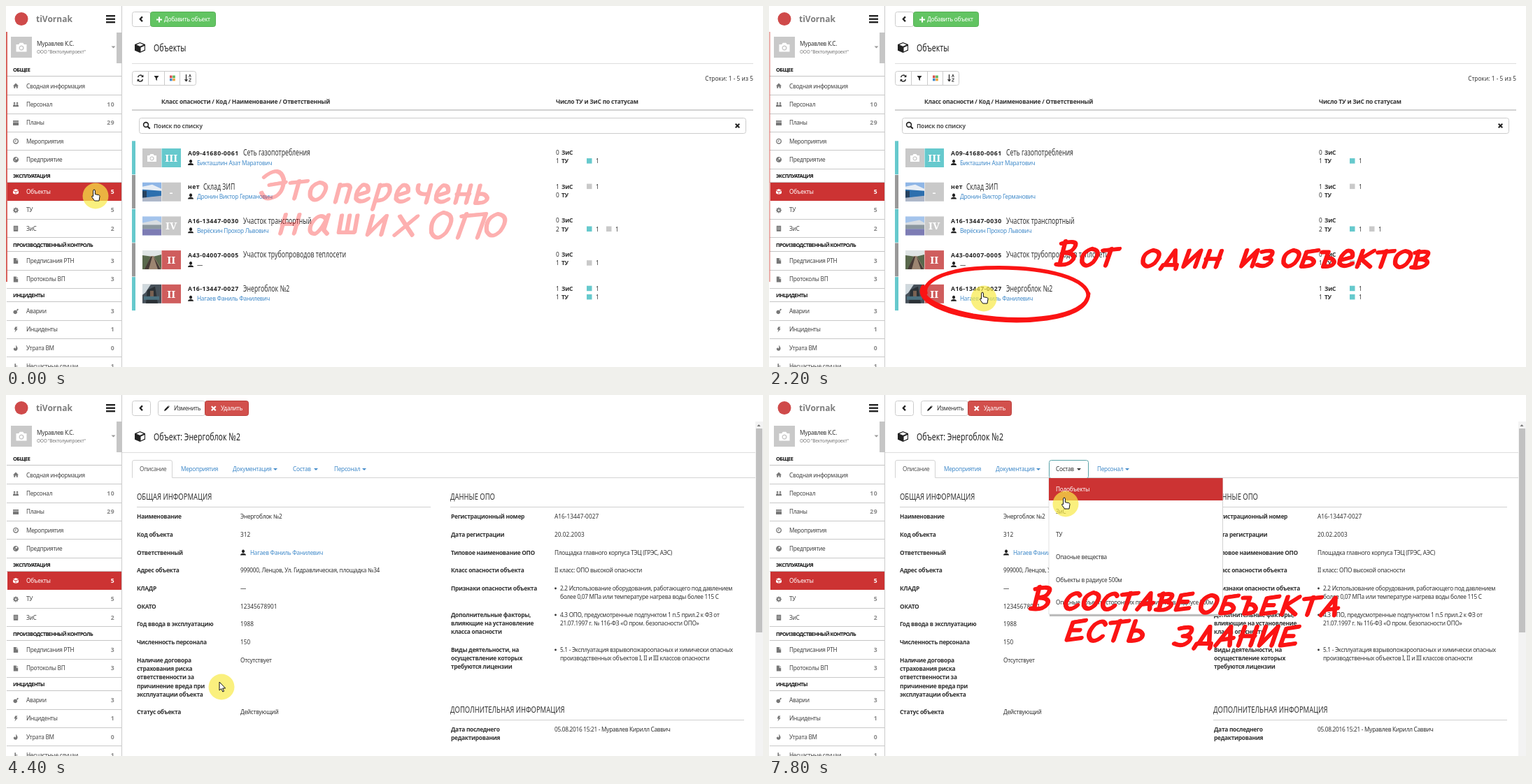
These frames come from a looping animation (1082 by 517 pixels, 8000 ms). An HTML page:

```html
<!DOCTYPE html>
<html lang="ru">
<head>
<meta charset="utf-8">
<style>
html,body{margin:0;width:100%;height:100%;overflow:hidden;background:#fff}
svg{display:block;width:100vw;height:100vh}
text{font:8.25px "Noto Sans","Open Sans",sans-serif;letter-spacing:-.28px;white-space:pre}
.b{font-weight:700;font-size:8.4px}
.cap{font-weight:700;font-size:7.4px;letter-spacing:-.58px}
.head{font-weight:700;font-size:8.5px;letter-spacing:-.22px}
.code{font-weight:700;font-size:8.7px;letter-spacing:.45px}
.num{letter-spacing:.05px}
.cnt{font-weight:700;font-size:8.6px;letter-spacing:.4px;text-anchor:end}
.org{font-size:6.6px;letter-spacing:-.3px}
.logo{font-weight:700;font-size:12px;letter-spacing:0}
.cls{font:700 15px "Noto Serif",serif;letter-spacing:0;text-anchor:middle}
.nar{letter-spacing:0}
.end{text-anchor:end}
.ink path{fill:none;stroke:#fb1414;vector-effect:non-scaling-stroke;stroke-linejoin:round;stroke-linecap:round}
</style>
</head>
<body>
<svg id="stage" viewBox="0 0 1082 517" preserveAspectRatio="none"></svg>
<script>
const TEAL = '#66c9cd', GREY = '#c9c9c9', RED = '#cf5d5d', ROW = '#cc3333', BLUE = '#428bca', DARK = '#333';

// ---- drawing helpers
const text = (x, y, s, cls = '', fill = DARK) => `<text x="${x}" y="${y}" class="${cls}" fill="${fill}">${s}</text>`;
const narrow = (x, y, size, s, fill = DARK) =>
  `<text class="nar" transform="translate(${x} ${y}) scale(.7 1)" style="font-size:${size}px" fill="${fill}">${s}</text>`;
const rect = (x, y, w, h, fill, more = '') => `<rect x="${x}" y="${y}" width="${w}" height="${h}" fill="${fill}" ${more}/>`;
const hline = (x1, x2, y, c = '#ddd', w = 1) => `<path d="M${x1} ${y}H${x2}" stroke="${c}" stroke-width="${w}"/>`;
const icon = (d, x, y, size, fill) =>
  `<path d="${d}" transform="translate(${x} ${y}) scale(${size / 10})" fill="${fill}" fill-rule="evenodd"/>`;
const box = (x, y, w, h, fill = '#fff', line = '#ccc') => rect(x + .5, y + .5, w - 1, h - 1, fill, `stroke="${line}" rx="3"`);
const caret = (x, y, c) => `<path d="M${x} ${y}h6l-3 3z" fill="${c}"/>`;
const group = (id, body, more = '') => `<g id="${id}" ${more}>${body}</g>`;

const menuIcon = {
  home: 'M5 0L10 5H8.5V9H6V6H4V9H1.5V5H0z',
  people: 'M2.5 1a1.7 1.7 0 1 0 .1 0zM7.5 1a1.7 1.7 0 1 0 .1 0zM0 9Q0 4.8 2.5 4.8T5 9Q5 4.8 7.5 4.8T10 9z',
  plan: 'M0 1H10V3H0zM0 4H10V9.5H0z',
  clock: 'M5 0a5 5 0 1 0 .1 0zM5 1.6a3.4 3.4 0 1 1-.1 0zM4.4 2.5H5.6V5.6H3V4.6H4.4z',
  globe: 'M5 0a5 5 0 1 0 .1 0zM5 2H8L7 5L4 4zM2 5L4 6V8z',
  file: 'M1 0H6V4H9V10H1zM7 0L9 3H7z',
  bomb: 'M4 3a3.6 3.6 0 1 0 .1 0zM6 3L8.5.5L10 2L7.5 4.5z',
  bolt: 'M4 0H8L6 3.5H8.5L3 10L4.5 5H2z'
};
const moreIcon = {
  cube: 'M5 0L10 2.2L5 4.4L0 2.2zM0 3.2L4.5 5.2V10L0 7.8zM10 3.2L5.5 5.2V10L10 7.8z',
  block: 'M5 0L10 2V7.8L5 10L0 7.8V2zM5 .9L8.4 2.3L5 3.8L1.6 2.3zM5.7 5L9.3 3.3V7.2L5.7 8.9z',
  gear: 'M4 0H6V2L8 1L9 2L8 4H10V6H8L9 8L8 9L6 8V10H4V8L2 9L1 8L2 6H0V4H2L1 2L2 1L4 2zM5 3.5a1.5 1.5 0 1 0 .1 0z',
  house: 'M1 0H9V10H1zM3 2V3.5H4.3V2zM5.7 2V3.5H7V2zM3 5V6.5H4.3V5zM5.7 5V6.5H7V5z',
  fire: 'M5 0Q9 4 8 7Q7 10 5 10Q1 10 1 6L3 4Q3 6 4.5 6Q6 4 5 0z',
  chair: 'M3 0H5V4H8V5H5V6H8L9 9H8L7 7H4Q2 9 3 6z'
};
const uiIcon = {
  camera: 'M0 2H2.5L3.5.5H6.5L7.5 2H10V9H0zM5 3a2.4 2.4 0 1 0 .1 0zM5 4a1.4 1.4 0 1 1-.1 0z',
  user: 'M5 0a2.6 3 0 1 0 .1 0zM0 10Q0 6.5 5 6.5T10 10z',
  plus: 'M3.7 0H6.3V3.7H10V6.3H6.3V10H3.7V6.3H0V3.7H3.7z',
  cross: 'M2 0L5 3L8 0L10 2L7 5L10 8L8 10L5 7L2 10L0 8L3 5L0 2z',
  pencil: 'M0 10L1 7L7 1L9 3L3 9zM7.6.4L8.2 0L10 1.8L9.6 2.4z',
  filter: 'M0 0H10L6.2 5V10L3.8 8V5z',
  back: 'M6 0L8 2L5 5L8 8L6 10L1.5 5z'
};

// ---- sidebar
const menu = [
  ['ОБЩЕЕ', 91, [['home', 'Сводная информация'], ['people', 'Персонал', 10], ['plan', 'Планы', 29], ['clock', 'Мероприятия'], ['globe', 'Предприятие']]],
  ['ЭКСПЛУАТАЦИЯ', 242.5, [['cube', 'Объекты', 5], ['gear', 'ТУ', 5], ['house', 'ЗиС', 2]]],
  ['ПРОИЗВОДСТВЕННЫЙ КОНТРОЛЬ', 341.5, [['file', 'Предписания РТН', 3], ['file', 'Протоколы ВП', 3]]],
  ['ИНЦИДЕНТЫ', 413.5, [['bomb', 'Аварии', 3], ['bolt', 'Инциденты', 1], ['fire', 'Утрата ВМ', 0], ['chair', 'Несчастные случаи', 1]]]
];
const icons = { ...menuIcon, ...moreIcon };

function sidebar() {
  let s = '<circle cx="22" cy="18.5" r="9.5" fill="#cf4a4a"/>' + text(43, 22.5, 'tiVornak', 'logo', '#7d7d7d');
  for (const y of [13, 17.5, 22]) s += rect(143, y, 13, 2.4, '#222');
  s += rect(7, 44, 30, 30, GREY) + icon(uiIcon.camera, 14.5, 52, 15, '#fff');
  s += text(44, 57, 'Муравлев К.С.') + text(44, 68, 'ООО "Вектолумпроект"', 'org', '#777') + caret(150.5, 57.5, '#999');
  for (const [title, y, items] of menu) {
    s += text(10, y + 3, title, 'cap', '#111') + hline(1, 165, Math.round(y + 9) + .5, '#c4c4c4');
    items.forEach(([ic, label, n], i) => {
      const c = y + 23.6 + i * 26.35, on = label === 'Объекты';
      if (on) s += rect(2, 253, 164, 26, ROW);
      else s += hline(1, 165, Math.round(c + 12.6) + .5, '#c9c9c9');
      s += icon(icons[ic], 10, c - 4, 8, on ? '#fff' : '#777');
      s += text(29, c + 3, label, '', on ? '#fff' : '#444');
      if (n !== undefined) s += text(155, c + 3, n, 'cnt', on ? '#fff' : '#888');
    });
  }
  return s + '<path d="M165.5 0V517" stroke="#ccc"/>' + rect(158, 38, 8, 44, '#c6c6c6');
}

// ---- list page
const thumbs = [
  [['#c9c9c9', 'M0 0H27V27H0z']],
  [['#8fb6e6', 'M0 0H27V27H0z'], ['#e8eef5', 'M0 6L14 3L27 9V13L0 11z'], ['#2d6fae', 'M0 10L27 12V20L0 22z'], ['#26415e', 'M0 12H6V22H0z'], ['#aeb6c6', 'M0 22L27 19V27H0z']],
  [['#a4c4ec', 'M0 0H27V27H0z'], ['#d8dde2', 'M0 9L20 5L27 9V18H0z'], ['#8c98a0', 'M0 12H27V18H0z'], ['#7d7cb4', 'M0 18H27V27H0z']],
  [['#59684c', 'M0 0H27V27H0z'], ['#dfe4e4', 'M0 0H27V6L15 9L0 7z'], ['#9c8571', 'M12 8H16L27 27H4z'], ['#453a35', 'M12 9L3 27H9L14 9zM16 9L22 27H26z']],
  [['#47515a', 'M0 0H27V27H0z'], ['#cfd8dd', 'M0 0H12L4 12L0 15z'], ['#2b3136', 'M7 8L18 3L22 27H5z'], ['#796152', 'M11 9H16V18H11z'], ['#4c7180', 'M2 17H24V22H2z']]
];
const rows = [
  ['A09-41680-0061', 'Сеть газопотребления', 'Бикташлин Азат Маратович', 'III', TEAL, 0, '', 1, 't'],
  ['нет', 'Склад ЗИП', 'Дронин Виктор Германович', '-', GREY, 1, 'g', 0, ''],
  ['A16-13447-0030', 'Участок транспортный', 'Верёскин Прохор Львович', 'IV', GREY, 0, '', 2, 'tg'],
  ['A43-04007-0005', 'Участок трубопроводов теплосети', '', 'II', RED, 0, '', 1, 'g'],
  ['A16-13447-0027', 'Энергоблок №2', 'Нагаев Фаниль Фанилевич', 'II', RED, 1, 't', 1, 't']
];
const marks = (s, y) => [...s].map((c, i) =>
  rect(830 + i * 28, y - 7, 7.5, 7.5, c === 't' ? TEAL : GREY) + text(843 + i * 28, y, 1, 'num')).join('');
const stat = (y, n, label, s) => text(786, y, n, 'num') + text(794, y, label, 'b') + marks(s, y);

function listRow([code, title, man, cls, color, zis, zm, tu, tm], i) {
  const y = 193.3 + i * 48.7;
  let s = rect(180, y, 5, 48, i % 2 ? '#999' : TEAL);
  s += `<g transform="translate(195 ${y + 10.7})">` + thumbs[i].map(([c, d]) => `<path d="${d}" fill="${c}"/>`).join('') + '</g>';
  if (!i) s += icon(uiIcon.camera, 202, y + 18, 13, '#fff');
  s += rect(222.5, y + 10.7, 27.5, 27, color) + text(236.2, y + 29.5, cls, 'cls', '#fff');
  s += text(260, y + 20.3, code, 'code', '#222') + narrow(code === 'нет' ? 282 : 339, y + 20.8, 12.4, title);
  s += icon(uiIcon.user, 260, y + 26.6, 8, '#222') + text(273, y + 34.3, man || '—', '', man ? BLUE : DARK);
  return s + stat(y + 19.6, zis, 'ЗиС', zm) + stat(y + 31.8, tu, 'ТУ', tm);
}

function listPage() {
  let s = icon(moreIcon.block, 184, 52, 15, '#222') + narrow(211, 64.5, 15, 'Объекты', '#222') + hline(180, 1068, 82.5);
  s += box(180, 93, 92, 21);
  for (const x of [203.5, 226.5, 248.5]) s += `<path d="M${x} 93V114" stroke="#ccc"/>`;
  s += '<path d="M188.6 102a3.6 3.6 0 0 1 6.5-1.4M195.4 105a3.6 3.6 0 0 1-6.5 1.4" fill="none" stroke="#222" stroke-width="1.4"/><path d="M196.4 98.6v3.4h-3.4zM187.6 108.4V105H191z" fill="#222"/>';
  s += icon(uiIcon.filter, 211.5, 100, 7, '#222');
  ['#d9534f', '#5cb85c', '#428bca', '#f0a23c'].forEach((c, i) => s += rect(234 + i % 2 * 4.2, 99.5 + (i >> 1) * 4.2, 3.6, 3.6, c));
  s += '<path d="M257.5 98v9M255.5 105l2 2.5 2-2.5" fill="none" stroke="#222" stroke-width="1.2"/><path d="M261.5 102l1.4-4 1.4 4M261.5 104h3l-3 4h3" fill="none" stroke="#222" stroke-width=".9"/>';
  s += text(1068, 106.5, 'Строки: 1 - 5 из 5', 'end num');
  s += text(222, 139.8, 'Класс опасности / Код / Наименование / Ответственный', 'head') + text(786, 139.8, 'Число ТУ и ЗиС по статусам', 'head');
  s += hline(180, 1068, 149, '#d2d2d2', 2) + box(190, 160, 868, 23);
  s += '<circle cx="200" cy="170" r="3.4" fill="none" stroke="#222" stroke-width="1.6"/><path d="M202.5 172.5l3.2 3.2" stroke="#222" stroke-width="2"/>';
  s += text(211, 174.7, 'Поиск по списку', 'head', '#555') + icon(uiIcon.cross, 1042, 168, 7, '#222');
  return s + rows.map(listRow).join('');
}

// ---- object page: "|" starts a new line, "*" a bullet
const left = [
  [174, 'Наименование', 'Энергоблок №2'], [200, 'Код объекта', '312'], [225.5, 'Ответственный', ''],
  [251, 'Адрес объекта', '999000, Ленцов, Ул. Гидравлическая, площадка №34'], [277, 'КЛАДР', '—'],
  [302.5, 'ОКАТО', '12345678901'], [328, 'Год ввода в эксплуатацию', '1988'], [354, 'Численность персонала', '150'],
  [380, 'Наличие договора|страхования риска|ответственности за|причинение вреда при|эксплуатации объекта', 'Отсутствует'],
  [454, 'Статус объекта', 'Действующий']
];
const right = [
  [174, 'Регистрационный номер', 'A16-13447-0027'], [200, 'Дата регистрации', '20.02.2003'],
  [225.5, 'Типовое наименование ОПО', 'Площадка главного корпуса ТЭЦ (ГРЭС, АЭС)'],
  [251, 'Класс опасности объекта', 'II класс: ОПО высокой опасности'],
  [277, 'Признаки опасности объекта', '*2.2 Использование оборудования, работающего под давлением|более 0,07 МПа или температуре нагрева воды более 115 С'],
  [315, 'Дополнительные факторы,|влияющие на установление|класса опасности', '*4.3 ОПО, предусмотренные подпунктом 1 п.5 прил.2 к ФЗ от|21.07.1997 г. № 116-ФЗ «О пром. безопасности ОПО»'],
  [365, 'Виды деятельности, на|осуществление которых|требуются лицензии', '*5.1 - Эксплуатация взрывопожароопасных и химически опасных|производственных объектов I, II и III классов опасности'],
  [479, 'Дата последнего|редактирования', '05.08.2016 15:21 - Муравлев Кирилл Саввич']
];
const lines = (x, y, s, cls) => s.split('|').map((l, i) => text(x, y + 3 + i * 12.2, l, cls)).join('');
const field = (x1, x2) => ([y, label, value]) => {
  const dot = value[0] === '*', plain = /^[\d.A-Z-]+$/.test(value);
  return lines(x1, y, label, 'b') + (dot ? `<circle cx="785.5" cy="${y}" r="1.4" fill="#333"/>` : '') +
    lines(x2 + (dot ? 8 : 0), y, value.replace('*', ''), plain ? 'num' : '');
};
const section = (x, y, s) => narrow(x, y, 13.5, s) + hline(x, x + 420, y + 11, '#d0d0d0');

function cardPage() {
  let s = box(217, 8, 68, 22) + icon(uiIcon.pencil, 226, 15, 8, '#222') + text(240, 22, 'Изменить');
  s += box(284, 8, 63, 22, '#d2504c', '#bb403c') + icon(uiIcon.cross, 293, 15.5, 7.5, '#fff') + text(307, 22, 'Удалить', '', '#fff');
  s += icon(moreIcon.block, 184, 52, 15, '#222') + narrow(211, 64.5, 15, 'Объект: Энергоблок №2', '#222') + hline(166, 1071, 82.5);
  s += '<path d="M180 118.5H180.5V96Q180.5 93.5 183 93.5H235Q237.5 93.5 237.5 96V118.5H1071" fill="none" stroke="#d4d4d4"/>';
  s += text(191, 109, 'Описание', '', '#555') + text(250, 109, 'Мероприятия', '', BLUE);
  s += group('docs', text(324, 109, 'Документация', '', 'inherit') + caret(382, 105, 'inherit'));
  s += text(410, 109, 'Состав', '', BLUE) + caret(440, 105, BLUE) + text(469, 109, 'Персонал', '', BLUE) + caret(509, 105, BLUE);
  s += section(187, 149.5, 'ОБЩАЯ ИНФОРМАЦИЯ') + section(635, 149.5, 'ДАННЫЕ ОПО') + section(635, 454.5, 'ДОПОЛНИТЕЛЬНАЯ ИНФОРМАЦИЯ');
  s += left.map(field(187, 335)).join('') + right.map(field(636, 784)).join('');
  s += icon(uiIcon.user, 335, 221.5, 8, '#222') + text(349, 228.5, 'Нагаев Фаниль Фанилевич', '', BLUE);
  return s + rect(1071, 38, 11, 479, '#f3f3f3') + rect(1072, 48, 9, 292, '#c1c1c1') + '<path d="M1073.5 45h5l-2.5-3z" fill="#777"/>';
}

const drops = ['Подобъекты', 'ЗиС', 'ТУ', 'Опасные вещества', 'Объекты в радиусе 500м', 'Опасные объекты сторонних предприятий в радиусе 500м'];
function dropdown() {
  let s = box(400, 93, 57, 27, '#fff', '#5aa3a8') + text(410, 109, 'Состав') + caret(440, 105, DARK);
  s += rect(401, 120, 248, 197, '#bbb') + rect(400, 119, 248.5, 195, '#fff', 'stroke="#ccc" stroke-width=".6"');
  drops.forEach((d, i) => s += text(410, 138 + i * 32.4, d));
  return s + group('pick', rect(400, 119, 248.5, 32, ROW) + text(410, 138, drops[0], '', '#fff'));
}

// ---- brush lettering, every letter in a 10 by 10 cell
const straight = {
  Т: 'M0 1L10 0M5 0L4 10', А: 'M0 10L6 0L8 10M2 7L9 6', Е: 'M9 0L2 1L1 10L9 9M2 5L7 5', К: 'M2 0L1 10M9 0L2 5L9 10',
  Д: 'M0 11.5L1 9L9 9V11.5M2 9L6 0L8 9', Н: 'M2 0L1 10M9 0L8 10M1 5L9 5', И: 'M2 0L1 10L9 0L8 10', П: 'M0 10L2 0M0 1L11 0L9 10',
  х: 'M1 0L9 10M10 0L0 10', ш: 'M1 0V9H5V0M5 9H9V0'
};
const round = {
  В: 'M2 0L2 10M0 1Q10-1 8 3Q7 5 2 5Q10 5 9 8Q7 11 0 10', С: 'M9 2Q7-1 3 2Q-1 7 3 10Q6 11 9 8', О: 'M5 0Q-1 2 1 8Q4 12 8 8Q12 1 5 0',
  Б: 'M9 0L2 1L1 10Q9 10 8 7Q6 4 2 5', Ъ: 'M0 1H4L3 10Q10 10 9 7Q7 4 4 5', Ь: 'M2 0L1 10Q9 10 8 7Q6 4 2 5'
};
const script = {
  Э: 'M0 2Q6-3 9 3Q10 9 5 10Q2 11 0 8M3 5L10 4', З: 'M1 1Q9-1 8 3Q7 5 4 5Q10 5 8 8Q5 11 0 9',
  п: 'M2 0L1 10M2 1Q8-1 9 2L8 10', р: 'M2 0L0 14M2 1Q9-2 9 4Q8 9 2 9', е: 'M1 6L8 4Q8 0 4 0Q0 3 1 8Q4 11 9 8',
  ч: 'M1 0Q0 6 8 5M9 0L8 10', а: 'M8 2Q4-2 1 5Q0 10 4 10Q7 8 9 0L8 8L10 10'
};
const letters = { ...straight, ...round, ...script };

// word: text, x, top, letter width, advance, height, drop per letter
const word = (pen, slant) => ([s, x, y, w, step, h, dy = 0]) => [...s].map((c, i) => {
  const d = letters[c] || letters[c.toUpperCase()];
  const put = (k, kw) => `<path d="${d}" stroke-width="${pen * kw}" transform="translate(${x + i * step + k + h * .1} ${y + i * dy - k * .6}) skewX(${-slant}) scale(${w / 10} ${h / 10})"/>`;
  return put(0, 1) + put(1.6, .8);
}).join('');
const note = (id, pen, slant, words) => group(id, words.map(word(pen, slant)).join(''), 'class="ink"');

const notes = [
  note('intro', 5.2, 10, [['Э', 366, 238, 32, 0, 37], ['то', 404, 251, 24, 29, 25, 2], ['перечень', 470, 256, 22, 28.6, 25, .2],
    ['наших', 391, 299, 28, 41.5, 27, .6], ['О', 606, 296, 30, 0, 36], ['П', 648, 298, 31, 0, 34], ['О', 685, 298, 28, 0, 31]]),
  group('ring', '<path stroke-width="5.4" d="M224 411C219 395 250 377 310 375C400 372 459 392 456 416C450 450 360 457 290 445C240 436 211 419 220 402"/>' +
    '<path stroke-width="5" d="M457 412C453 448 365 455 292 443C250 435 222 421 222 410"/>', 'class="ink"'),
  note('one', 5.4, 14, [['В', 415, 337, 25, 0, 33], ['от', 447, 348, 23, 28, 24], ['один', 534, 350, 24, 29.5, 23, .3],
    ['из', 676, 350, 22, 24, 23], ['объектов', 735, 350, 23, 26.6, 23, .2]]),
  note('part', 5.6, 14, [['В', 378, 275, 25, 0, 31], ['СОСТАВЕ', 423, 283, 22, 26.6, 23, .3], ['ОБЪЕКТА', 617, 287, 24, 29.2, 25, .6],
    ['ЕСТЬ', 427, 323, 25, 29.5, 28, .4], ['ЗДАНИЕ', 582, 332, 25, 30, 27]])
].join('');

const cursor = group('cursor', '<circle r="18.5" fill="#f8ea48" opacity=".7"/>' +
  '<path id="hand" d="M-3.4-7Q-3.4-9-2-9T-.6-7V-2.4L4.6-1.4Q6-1 6 .6L5 7H-1.4L-5.4 1.4Q-6-.4-3.4.6z" fill="#fff" stroke="#111"/>' +
  '<path id="arrow" d="M-3-7V5L-.3 2.6L1.8 7L3.6 6.2L1.6 2H5.6z" fill="#fff" stroke="#111"/>');

stage.innerHTML = rect(0, 0, 1082, 517, '#fff') + sidebar() + rect(0, 37, 2, 358, '#d5564f', 'id="edge"') +
  box(180, 8, 27, 22) + icon(uiIcon.back, 189, 14.5, 8.5, '#222') +
  group('add', box(206, 8, 94, 22, '#62c462', '#55b055') + icon(uiIcon.plus, 215, 15.5, 8, '#fff') + text(226, 22, 'Добавить объект', '', '#fff')) +
  group('list', listPage()) + group('card', cardPage()) + group('drop', dropdown()) + notes + cursor;

// ---- timeline, hard steps of 200 ms
const STEP = 200, LOOP = 8000;
const el = id => document.getElementById(id);
const show = (id, on) => el(id).style.display = on ? '' : 'none';
const fade = (id, v) => { el(id).style.opacity = v; show(id, v > 0); };
// value of a track made of [time, value...] keys
const at = (keys, t) => keys.filter(k => k[0] <= t).pop();
// level that moves from a to b in n equal steps, the first at t0
const ramp = (t, t0, n, a = 0, b = 1) => a + (b - a) * Math.min(n, Math.max(0, Math.floor((t - t0) / STEP) + 1)) / n;

const path = [
  [0, 128, 272], [1600, 193, 328], [1800, 240, 368], [2000, 280, 400], [2200, 307, 419], [4000, 308, 418],
  [6200, 388, 125], [6400, 404, 112], [6600, 418, 109], [7200, 424, 112], [7400, 424, 125], [7600, 424, 142], [7800, 424, 156]
];
function place(t) {
  if (t < 5000 || t >= 6200) return at(path, t).slice(1);
  const k = ramp(t, 5000, 6);
  return [308 + 63 * k, 418 - 278 * (1 - (1 - k) ** 1.675)];
}

function draw(t) {
  const card = t >= 4400;
  show('list', !card);
  show('card', card);
  show('add', t < 4200);
  show('drop', t >= 7200);
  show('pick', t >= 7400);
  el('docs').setAttribute('fill', t >= 6400 && t < 7200 ? '#23527c' : BLUE);
  fade('edge', ramp(t, 1600, 8, .9, 0));
  const out = 1 - ramp(t, 3400, 4);
  fade('intro', t < 1800 ? ramp(t, 0, 3) : 1 - ramp(t, 1800, 3));
  fade('ring', ramp(t, 1600, 4) * out);
  fade('one', ramp(t, 1800, 3) * out);
  fade('part', ramp(t, 6200, 2));
  const [x, y] = place(t), arrow = t >= 4000 && t < 6200;
  el('cursor').setAttribute('transform', `translate(${x} ${y})`);
  show('hand', !arrow);
  show('arrow', arrow);
}

function tick(now) {
  draw(Math.floor(now % LOOP / STEP) * STEP);
  requestAnimationFrame(tick);
}
draw(0);
requestAnimationFrame(tick);
</script>
</body>
</html>
```
